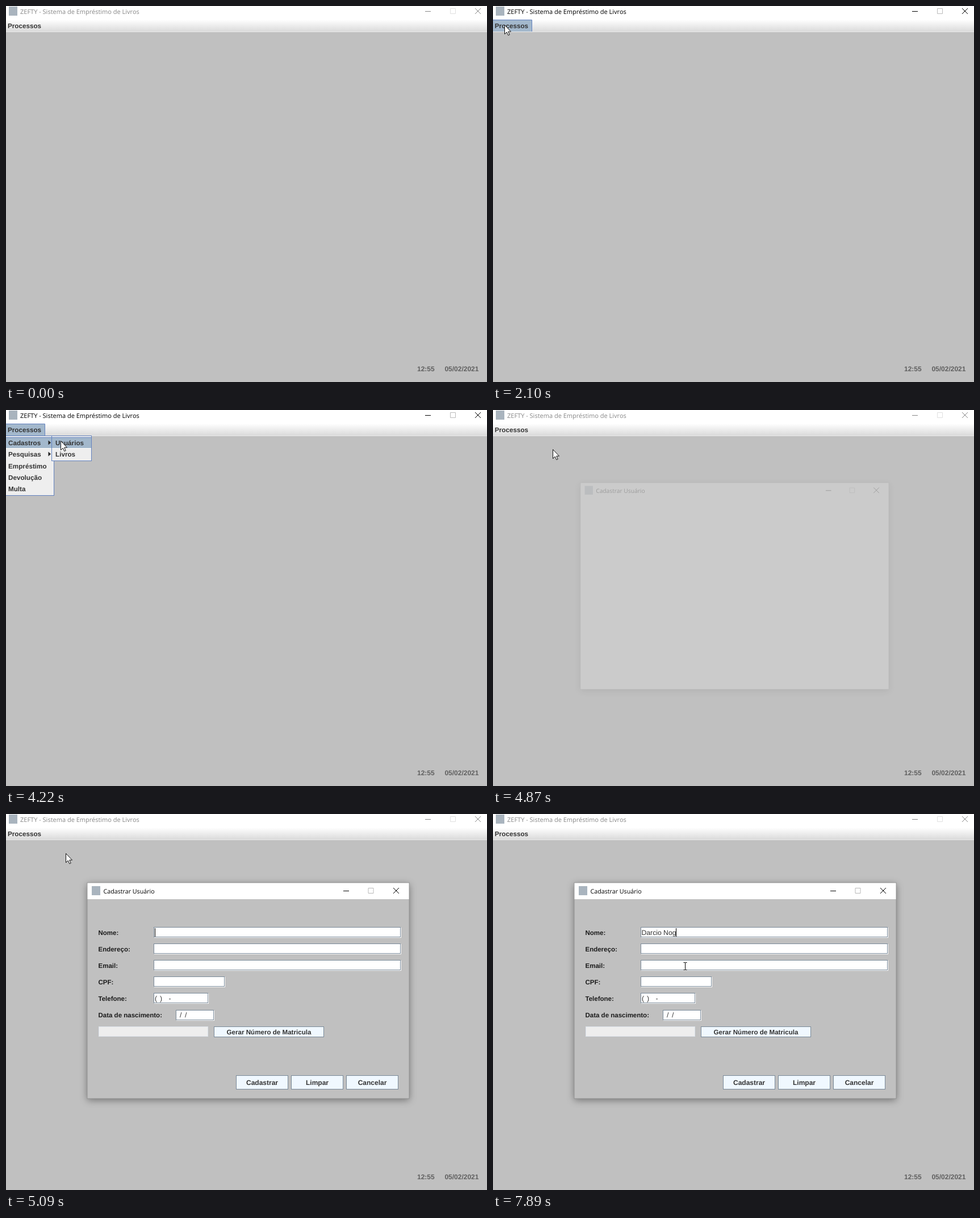
Recreate the animation shown at these times as an HTML page. Size 847 by 662 pixels, loop 8000 ms.

```html
<!DOCTYPE html>
<html lang="pt">
<head>
<meta charset="utf-8">
<title>Sistema de Empréstimo de Livros</title>
<style>
  html, body { margin: 0; width: 100%; height: 100%; overflow: hidden; background: #c0c0c0; }
  svg { display: block; width: 100%; height: 100%; }
  text { font: bold 11.7px "Liberation Sans", Arial, sans-serif; fill: #333; white-space: pre; text-rendering: geometricPrecision; }
  .title { font: 11px "Open Sans", "Noto Sans", sans-serif; }
  .label { font-size: 11.5px; fill: #1c1c1c; }
  .value { font-weight: normal; font-size: 12.2px; }
  .clock { font-size: 12px; fill: #606060; }
  .control { fill: none; stroke-width: 1; }
</style>
</head>
<body>
<svg id="stage" viewBox="0 0 847 662" xmlns="http://www.w3.org/2000/svg">
  <defs>
    <linearGradient id="bar" x1="0" y1="0" x2="0" y2="1">
      <stop offset="0" stop-color="#fff"/>
      <stop offset="1" stop-color="#dadada"/>
    </linearGradient>
    <filter id="shadow" x="-10%" y="-10%" width="120%" height="125%">
      <feDropShadow dx="0" dy="3" stdDeviation="6.5" flood-color="#000" flood-opacity=".4"/>
    </filter>
  </defs>
</svg>
<script>
const LOOP = 8000;
const stage = document.getElementById("stage");
const TYPED = "Darcio Nog";
const KEY_TIMES = [6560, 6790, 6940, 7020, 7180, 7250, 7420, 7650, 7720, 7890];

function add(parent, tag, attrs = {}, content = "") {
  const node = document.createElementNS(stage.namespaceURI, tag);
  for (const key in attrs) node.setAttribute(key, attrs[key]);
  node.textContent = content;
  parent.append(node);
  return node;
}
const group = parent => add(parent, "g");
const box = (parent, x, y, width, height, fill) =>
  add(parent, "rect", { x, y, width, height, fill });
const framed = (parent, x, y, w, h, fill, stroke) =>
  add(parent, "rect", { x: x + .5, y: y + .5, width: w - 1, height: h - 1, fill, stroke });
const label = (parent, x, y, str, attrs = {}) => add(parent, "text", { x, y, ...attrs }, str);
const show = (node, on) => node.setAttribute("display", on ? "inline" : "none");

// Minimise, maximise and close marks centred on three columns.
function controls(parent, xs, y) {
  const [a, b, c] = xs;
  const strong = add(parent, "path", {
    class: "control",
    d: `M${a - 5} ${y + .5}h10M${c - 5} ${y - 5}l10 10m0-10l-10 10`
  });
  const faint = add(parent, "path", { class: "control", d: `M${b - 4.5} ${y - 4.5}h9v9h-9z` });
  return { strong, faint };
}

// Main window
const BORDER = "#6382bf", HOVER = "#a3b8cc", STEEL = "#7a8a99";
box(stage, 0, 0, 847, 662, "#c0c0c0");
box(stage, 0, 0, 847, 24, "#fff");
box(stage, 5, 1, 15, 16, "#a9b4be");
const mainTitle = label(stage, 25, 14, "ZEFTY - Sistema de Empréstimo de Livros", { class: "title" });
const mainControls = controls(stage, [743, 787, 831], 9);
box(stage, 0, 24, 847, 21, "url(#bar)");
box(stage, 0, 45, 847, 1, "#eaeaea");
const menuHighlight = group(stage);
box(menuHighlight, 0, 24, 68, 21, HOVER);
add(menuHighlight, "path", { class: "control", d: "M0 24.5h68.5v20.5", stroke: BORDER });
label(stage, 3, 39, "Processos");
label(stage, 724, 643, "12:55", { class: "clock" });
label(stage, 772.4, 643, "05/02/2021", { class: "clock" });

// Menus
function hoverBar(parent, x, w) {
  const bar = group(parent);
  box(bar, x, 48, w, 20, HOVER);
  box(bar, x, 48, w, 1, BORDER);
  box(bar, x, 67, w, 1, "#fff");
  return bar;
}
const popup = group(stage);
framed(popup, -1, 45, 86, 106, "#eee", BORDER);
const groupHover = hoverBar(popup, 0, 84);
["Cadastros", "Pesquisas", "Empréstimo", "Devolução", "Multa"].forEach((name, i) => {
  const y = Math.round(62 + i * 20.3);
  label(popup, 4, y, name);
  if (i < 2) add(popup, "path", { d: `M74.5 ${y - 8.5}v8l4.5-4z`, fill: "#222" });
});
const submenu = group(stage);
framed(submenu, 80, 45, 71, 45, "#eee", BORDER);
const itemHover = hoverBar(submenu, 81, 69);
label(submenu, 87, 62, "Usuários");
label(submenu, 87, 82, "Livros");

// Dialog
const dialog = group(stage);
add(dialog, "rect", { x: 143, y: 121, width: 567, height: 380, fill: "#fff", filter: "url(#shadow)" });
const form = group(dialog);
box(form, 143, 150, 567, 351, "#c0c0c0");
add(dialog, "rect", { x: 143, y: 121, width: 567, height: 380, fill: "none", stroke: "#8c8c8c", "stroke-width": .8 });
box(dialog, 151, 127, 15, 16, "#a9b4be");
label(dialog, 171.5, 140, "Cadastrar Usuário", { class: "title", style: "font-size:10.7px;fill:#000" });
const dialogControls = controls(dialog, [599, 642.5, 687], 135);

function field(x, y, w) {
  box(form, x + 1, y + 1, w, 18, "#fff");
  framed(form, x, y, w, 18, "#fff", STEEL);
}
[["Nome:", 435], ["Endereço:", 435], ["Email:", 435], ["CPF:", 125], ["Telefone:", 96], ["Data de nascimento:", 0]]
  .forEach(([name, width], i) => {
    label(form, 162.5, 213 + i * 29, name, { class: "label" });
    if (width) field(260, 199 + i * 29, width);
  });
field(299, 345, 67);
[["(", 262, 329], [")", 271, 329], ["-", 286.5, 329], ["/", 306, 358], ["/", 315, 358]]
  .forEach(([ch, x, y]) => label(form, x, y, ch, { class: "value" }));
framed(form, 163, 374, 193, 18, "#eee", "#dbe2e9");

function button(x, y, w, h, name, size) {
  framed(form, x, y, w, h, "#f0f8ff", STEEL);
  label(form, x + w / 2, y + h / 2 + 4.5, name, { "text-anchor": "middle", style: `font-size:${size}px` });
}
button(366, 374, 194, 19, "Gerar Número de Matricula", 11.6);
["Cadastrar", "Limpar", "Cancelar"].forEach((name, i) => button(405 + i * 97, 460, 92, 25, name, 12));
const entry = label(form, 261.5, 213, "", { class: "value" });
const caret = box(form, 262, 201, 1, 15, "#000");

// Pointers
const arrow = add(stage, "path", {
  d: "M.5 .5v16l3.7-3.5 2.6 5.6 2.4-1.1-2.5-5.4h4.8z",
  fill: "#fff", stroke: "#111", "stroke-width": 1
});
const beam = add(stage, "path", {
  d: "M335.5 261.5h2.5l.5 1 .5-1h2.5M338.5 262v12M335.5 274.5h2.5l.5-1 .5 1h2.5",
  fill: "none", stroke: "#000"
});

// Pointer stops: [time, x, y]
const stops = [[70, 767, 625], [210, 416, 364]];
for (let i = 1; i <= 10; i++) stops.push([590 + (i - 1) * 73.3, 416 - 33.7 * i, 364 - 36.9 * i]);
stops.push(
  [1330, 47, -3], [1400, 40, 4], [1480, 29, 15], [1560, 20, 25], [1710, 20, 29], [1790, 20, 33],
  [2640, 25, 41], [2720, 31, 50], [2800, 36, 57], [3500, 37, 58],
  [3730, 52, 63], [3820, 74, 60], [3900, 90, 52], [4220, 96, 54], [4290, 101, 57],
  [4470, 102, 64], [4550, 105, 69], [5240, 160, 112], [5320, 255, 192]
);
// Dialog opening: [time, scale, opacity]
const opening = [[4870, .958, .18], [4950, .984, .65], [5010, .995, .9], [5090, 1, 1]];
const latest = (list, t) => list.filter(s => s[0] <= t).pop();
const within = (t, from, to) => t >= from && t < to;

function paint(node, strong, faint) {
  node.strong.setAttribute("stroke", strong);
  node.faint.setAttribute("stroke", faint);
}
paint(dialogControls, "#000", "#b8b8b8");

function render(t) {
  const active = within(t, 1940, 4870);
  mainTitle.style.fill = active ? "#000" : "#888";
  paint(mainControls, active ? "#000" : "#888", active ? "#bbb" : "#e0e0e0");

  show(menuHighlight, within(t, 2100, 4870));
  show(popup, within(t, 2170, 4870));
  show(groupHover, t >= 2720);
  show(submenu, within(t, 2950, 4870));
  show(itemHover, t >= 3820);

  const step = latest(opening, t);
  show(dialog, step);
  if (step) {
    const [, scale, opacity] = step;
    dialog.setAttribute("opacity", opacity);
    dialog.setAttribute("transform", `translate(402 286) scale(${scale}) translate(-402 -286)`);
    show(form, t >= 4950);
  }

  entry.textContent = TYPED.slice(0, KEY_TIMES.filter(k => k <= t).length);
  const width = entry.textContent ? entry.getComputedTextLength() : 0;
  caret.setAttribute("x", 262 + Math.floor(width + .02));
  show(caret, t < 5400 || within(t, 5950, 6500) || t >= KEY_TIMES[0]);

  const spot = latest(stops, t);
  show(arrow, spot && t < 5400);
  if (spot) arrow.setAttribute("transform", `translate(${Math.round(spot[1])} ${Math.round(spot[2])})`);
  show(beam, t >= 5400);
}

const start = performance.now();
function tick() {
  render((performance.now() - start) % LOOP);
  requestAnimationFrame(tick);
}
tick();
</script>
</body>
</html>
```
